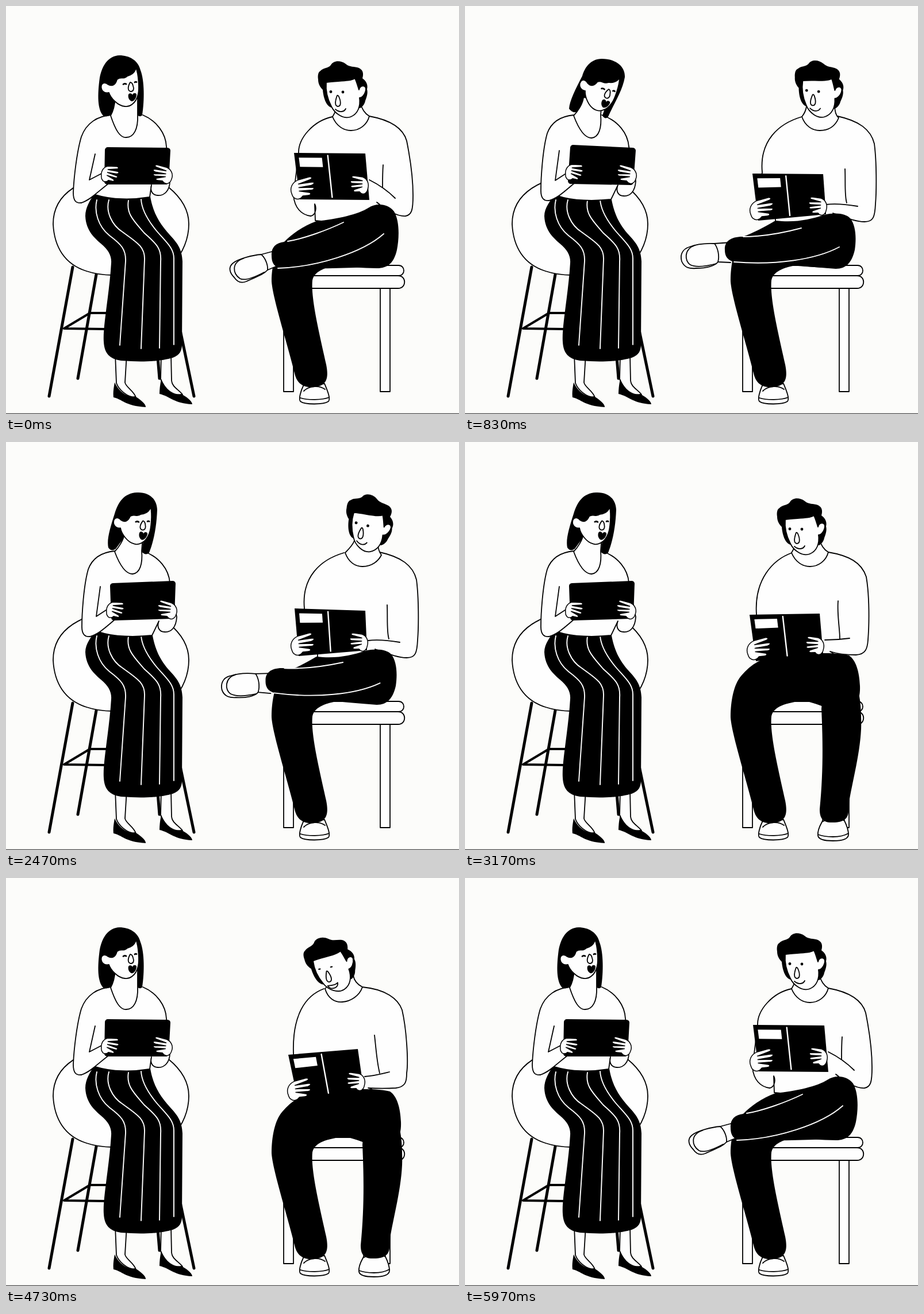
Write an HTML page that moves like this. It is 788x711 px and loops after 6010 ms.

```html
<!DOCTYPE html>
<html lang="en">
<head>
<meta charset="utf-8">
<title>Two seated readers</title>
<style>
  html, body { margin: 0; width: 100%; height: 100%; overflow: hidden; background: #fcfcfa; }
  svg { display: block; width: 100vw; height: 100vh; }
  .o { fill: #fefefe; stroke: #000; stroke-width: 1.8; stroke-linejoin: round; stroke-linecap: round; }
  .l { fill: none; stroke: #000; stroke-width: 1.8; stroke-linecap: round; stroke-linejoin: round; }
  .w { fill: none; stroke: #fff; stroke-width: 1.9; stroke-linecap: round; }
  .bar { fill: none; stroke: #000; stroke-width: 5; stroke-linecap: round; }
  .thin { stroke-width: 4; }
  .hand { fill: #fefefe; stroke: #000; stroke-width: 1.5; stroke-linejoin: round; vector-effect: non-scaling-stroke; }
</style>
</head>
<body>
<svg viewBox="0 0 788 711">
  <defs>
    <path id="hand" class="hand" d="M1 20C0 9 7 1 16 0L34 1C39 2 38 6 33 6L15 7L36 11C40 13 38 16 33 16L14 13L34 20C37 22 35 25 31 24L13 19L27 27C30 30 27 32 24 31L16 29C12 33 5 33 3 28C1 26 1 23 1 20Z"/>
  </defs>
  <rect y="709.7" width="788" height="1.3" fill="#555"/>

  <!-- woman: chair, legs, skirt -->
  <path class="bar" d="M116 455L75 680M157 468L125 649M303 565L327 680M264 612L267 649"/>
  <path class="bar thin" d="M101 562L172 563M101 562L146 535H178"/>
  <path class="o" d="M200 296C135 296 82 325 82 380C84 420 102 450 140 462C155 467 170 469 186 469L290 450C308 430 318 405 318 380C318 352 300 330 283 316Z"/>
  <path class="o" d="M190 606L192 657C196 668 210 682 226 682C222 670 208 664 207 656L210 606M270 606L269 650C276 668 290 680 307 677C300 668 289 664 288 653L287 606"/>
  <path d="M189 656C187 667 186 675 187 682C202 685 207 697 243 699C244 694 232 684 224 680C214 683 197 674 189 656ZM270 650C268 660 267 668 267 676C285 680 293 693 324 694C324 688 312 680 305 676C294 680 278 670 270 650Z"/>
  <path id="skirt"/>
  <path class="w" d="M158 338C153 358 160 384 180 400C200 415 209 424 208 445L198 591M179 338C173 358 184 382 203 394C228 412 242 420 241 442L235 597M213 339C209 362 222 374 240 395C258 412 271 420 269 445L267 596M235 337C236 355 248 375 262 392C280 413 292 422 292 440V590"/>

  <!-- woman: torso, head, tablet -->
  <path id="wShirt" class="o"/>
  <path id="wHair"/>
  <path id="wNeck" class="o"/>
  <g id="wHead">
    <path class="o" d="M178 137C186 141 191 136 193 128C200 122 204 129 211 122C216 121 225 117 226 107C231 120 232 145 230 153C226 172 213 176 207 175C194 174 182 160 179 151C170 153 164 146 166 138C168 133 174 133 178 137Z"/>
    <path class="l" d="M216 133C211 142 212 148 217 149C222 149 223 144 221 139C220 135 218 133 216 133Z"/>
    <path class="l" style="stroke-width:2.8" d="M204 136.5C206 135 207 135 209 136M224 133C225 132 226 132 227 132.500"/>
    <path d="M213 154C215 151 219 152 220 155C221 151 226 151 227 154C227 161 222 167 218 166C213 163 212 158 213 154Z"/>
  </g>
  <path id="wArm" class="o"/>
  <path id="tablet" stroke="#000" stroke-width="10" stroke-linejoin="round"/>
  <g id="wHandL"><use href="#hand" transform="translate(165 279) scale(.82 .85)"/></g>
  <g id="wHandR"><use href="#hand" transform="translate(294 286) rotate(18) scale(-.95 .85)"/></g>

  <!-- man: stool, planted foot -->
  <path class="o" d="M483 492H500V672H483ZM651 492H668V672H651Z"/>
  <path class="o" d="M520 452H683C695 452 695 470 683 470H520Z"/>
  <path class="o" d="M520 470H682C697 470 697 492 682 492H520Z"/>
  <path class="o" d="M518 660C512 672 509 685 512 689C520 695 552 695 561 689C565 684 559 670 554 658ZM512 683C525 687 550 687 562 682"/>
  <path class="l" d="M518 671C528 661 546 661 555 668"/>

  <g id="mBody">
    <path id="mShirt" class="o"/>
    <path id="mArm" class="l"/>
  </g>
  <path id="pants"/>
  <path id="ankle" class="o"/>
  <path id="shoe" class="o"/>
  <path id="sole" class="l"/>
  <path id="shin"/>
  <g id="seams"><path id="seamA" class="w"/><path id="seamB" class="w"/></g>

  <path id="mNeck" class="o"/>
  <g id="mHead">
    <path d="M547 113C553 107 560 109 565 103C569 95 582 94 591 101C598 107 606 105 614 108C622 112 622 119 620 126C627 131 630 138 628 145C630 152 627 160 625 165C624 171 620 176 616 178L566 177C556 174 552 158 551 146C545 140 543 134 543 128C542 121 543 115 547 113Z"/>
    <path class="o" d="M557 133C575 130 598 132 607 126C610 132 612 140 614 146C616 138 625 137 626 144C626 152 620 160 615 160C617 175 612 188 600 193C588 198 572 188 566 175C558 160 556 145 557 133Z"/>
    <path class="l" d="M576 156C572 167 572 174 577 175C583 175 583 167 579 158C578 156 577 155 576 156Z"/>
    <ellipse id="eyeL" cx="565" cy="149.500" rx="2.4"/>
    <ellipse id="eyeR" cx="586" cy="150" rx="2.4"/>
    <path id="mMouth" class="o"/>
  </g>
  <path id="book"/>
  <path id="label" fill="#fff"/>
  <path id="spine" class="w" style="stroke-width:2.4"/>
  <g id="mHandL"><use href="#hand" transform="translate(490 309) rotate(-18) scale(1.15 1)"/></g>
  <g id="mHandR"><use href="#hand" transform="translate(634 301) rotate(12) scale(-.87 .9)"/></g>
</svg>

<script>
const LOOP = 6010;
const KNEE = [650, 410];

// Each track lists [time, pose]; equal neighbours are holds.
const tracks = {
  woman: [[60, 0], [800, 1], [1900, 1], [2460, 2], [3220, 2], [3900, 0], [LOOP, 0]],
  man: [[0, 0], [650, 1], [1900, 1], [2460, 2], [2560, 2], [3160, 3], [3820, 3], [4420, 4], [5100, 4], [5800, 0], [LOOP, 0]],
  leg: [[0, 0], [650, 1], [1900, 1], [2460, 2], [2560, 2], [3160, 3], [4740, 3], [5560, 0], [LOOP, 0]]
};

// Poses of the woman: resting, leaning, upright.
const wHead = [[0, 0, 0], [15, 6, 22], [15, 3, 8]];
const wHandL = [[0, 0], [9, -3], [9, 0]];
const wHandR = [[0, 0], [9, 0], [8, -1]];
const wHair = [
  "M197 86C180 87 168 100 163 125C159 155 159 180 169 191C174 194 180 192 183 188L200 160L229 165L229 190C231 193 235 193 237 190C241 165 241 130 234 112C230 95 215 86 197 86Z",
  "M238 92C218 92 208 108 204 122C192 145 182 165 181 179C185 184 190 187 195 184L214 160L246 170L239 191C242 196 246 197 249 193C258 172 274 148 278 124C279 105 262 92 238 92Z",
  "M228 88C205 89 195 105 189 125C181 150 175 170 178 184C182 190 187 189 191 186L210 160L240 165L236 191C240 196 245 197 249 193C258 170 262 145 263 118C262 98 248 87 228 88Z"
];
const tablet = [
  "M177 251L281 252L278 306L176 306Z",
  "M188 247L292 252L288 307L184 305Z",
  "M186 251L290 247L288 303L188 306Z"
];
const wShirt = twice([
  "M182 190C160 192 140 203 131 228C123 255 118 300 117 325C117 340 122 344 131 343C142 340 150 332 156 329C185 338 220 338 250 333L253 312C250 322 255 330 264 330C275 331 285 322 285 305L279 245C278 222 262 200 238 190",
  "M189 190C168 192 151 200 143 222C135 250 132 300 132 322C132 336 138 340 146 339C154 337 158 334 162 331C188 340 225 340 254 337L266 312C262 322 266 331 276 331C288 332 296 322 297 305L285 245C283 222 267 200 238 190"
]);
const wNeck = twice([
  "M190 160C189 175 186 184 182 191C190 215 198 230 209 229C222 229 230 215 229 190L229 160",
  "M206 160C204 172 196 184 189 191C198 215 208 230 220 230C233 229 238 212 236 190L238 165"
]);
const wArm = twice([
  "M155 258L145 303L168 291L186 304C165 318 150 336 131 343",
  "M164 252L157 304L177 291L195 305C178 318 164 334 146 339"
]);

// Poses of the man: open, leaning back, looking up, book on lap, reading closely.
const mHead = [[0, 0, 0], [26, 0, 4], [33, -2, 13], [0, 2, 0], [-11, 1, -12]];
const mBody = [[0, 0], [0, 0], [2, 0], [0, 0], [0, 0]];
const mHandL = [[0, 0], [0, 36], [0, 35], [-5, 43], [-6, 51]];
const mHandR = [[0, 0], [-1, 37], [-1, 37], [-6, 43], [-6, 43]];
const squint = [[0], [0], [0], [0], [1]];
const corners = [
  [501, 256, 625, 257, 632, 338, 511, 337],
  [500, 292, 623, 293, 628, 363, 510, 374],
  [502, 290, 625, 294, 628, 363, 509, 373],
  [495, 301, 617, 299, 623, 370, 506, 382],
  [491, 308, 612, 298, 622, 368, 508, 388]
];
const openNeck = "M576 168C575 180 572 187 568 193C575 210 588 217 600 217C615 217 628 207 632 192C625 188 619 180 616 168";
const mNeck = [
  openNeck,
  "M594 175C593 182 590 188 586 193C592 210 605 217 617 217C635 217 645 207 650 195C644 190 643 182 643 172",
  "M606 172C603 180 596 187 590 193C596 210 608 217 620 217C637 217 648 207 653 197C648 190 647 184 647 174",
  openNeck,
  "M564 185C560 188 557 190 555 193C560 210 572 217 585 216C600 215 615 205 620 190C612 186 606 180 604 170"
];
const leanShirt = "M586 193C545 205 512 235 517 290L510 335C512 350 516 360 525 366C535 368 540 368 540 370L540 385L650 385C655 375 650 366 640 361C660 368 680 376 695 376C710 376 713 368 714 345C716 320 716 270 712 240C706 215 685 200 648 192";
const mShirt = [
  "M568 193C535 200 508 230 509 257L500 330C502 352 514 364 530 366C540 364 540 350 537 345L538 374L650 385C660 350 650 345 645 342C660 355 680 367 695 366C706 364 708 355 708 330C708 300 703 265 697 235C690 210 665 198 632 192",
  leanShirt, leanShirt,
  "M569 193C535 205 503 240 507 300L505 340C507 355 510 365 520 370C530 372 535 374 535 376L535 390L645 390C650 380 645 370 635 365C650 370 665 371 680 371C697 370 700 360 701 345C703 320 704 270 698 235C690 210 668 198 632 192",
  "M553 193C520 205 498 240 500 305L502 340C505 355 510 365 520 370C530 372 535 374 535 376L535 390L645 390C650 380 645 370 630 366C650 367 660 367 678 366C695 364 697 355 697 340C700 320 697 265 689 230C682 210 660 194 620 190"
];
const leanArm = "M661 284C662 305 660 330 664 343M628 346C645 344 665 346 683 349";
const mArm = [
  "M656 277C655 290 655 305 655 316M632 303C650 312 664 322 677 335",
  leanArm, leanArm,
  "M649 277C647 300 652 325 652 343M626 345C640 345 655 344 669 342",
  "M641 274C644 300 645 320 650 340M624 346C640 345 655 341 667 338"
];
const mouth = [
  "M573 180C580 186 588 185 591 179C588 185 580 186 573 180Z",
  "M573 181C580 182 588 182 591 179C592 188 577 191 573 181Z"
];

// Leg poses: raised, level, level and kicked, planted.
const planted = "C560 455 537 460 533 478C530 510 545 570 557 625C562 650 557 662 537 664C520 666 506 660 502 640C490 590 464 510 462 480";
const lap = [
  "M540 375C575 372 615 362 630 352C645 342 665 345 675 358C685 375 684 405 680 425C675 447 665 457 645 457C620 457 595 454 575 452" + planted + "C462 450 470 425 484 411C497 398 515 384 540 375Z",
  "M540 374C575 378 600 372 625 364C645 359 663 362 670 370C680 382 681 405 678 425C673 447 663 458 645 458C620 456 595 454 575 452" + planted + "C462 450 468 420 483 402C500 396 520 386 540 374Z",
  "M515 380C560 366 600 368 625 368C645 368 660 370 668 372C680 380 686 400 687 425C688 450 680 470 645 470C620 460 600 451 585 451" + planted + "C462 450 468 422 480 408C490 396 502 386 515 380Z"
];
const swings = {
  shin: [
    "M635 365C600 378 540 400 484 411C468 413 461 422 462 435C462 445 465 455 478 457C545 459 620 455 650 455C683 440 685 385 635 365Z",
    "M635 371C600 385 540 400 483 402C460 402 451 412 452 425C452 435 456 444 470 446C540 450 600 455 645 457C680 445 682 385 635 371Z",
    "M620 465C622 510 624 570 617 640C617 655 622 664 640 663C660 663 668 655 667 640C668 610 692 535 689 480C690 385 630 340 620 465Z"
  ],
  ankle: [
    "M470 426L444 433L455 460L474 452",
    "M462 412L434 414L440 446L462 447",
    "M624 650L621 664L660 662L659 650"
  ],
  shoe: [
    "M444 433C430 434 405 440 395 448C386 455 389 465 397 473C403 482 411 483 418 480C435 472 448 468 455 460C456 450 450 438 444 433Z",
    "M434 414C415 413 400 416 390 420C377 424 374 435 377 445C382 457 392 458 402 457C420 457 435 453 440 446C443 435 440 422 434 414Z",
    "M621 662C616 671 613 680 614 686C615 692 625 695 640 695C655 695 667 692 667 684C667 676 664 668 660 660C650 656 630 656 621 662Z"
  ],
  sole: [
    "M413 440C392 447 394 466 407 475C416 480 434 472 449 464",
    "M400 417C380 424 382 445 392 451C402 456 422 453 437 449",
    "M614 684C622 687 630 688 640 688C650 688 660 686 667 682"
  ],
  seamA: [
    "M490 410C520 405 560 390 587 377",
    "M484 402C520 402 555 395 585 387",
    "M622 640C624 590 624 530 624 480"
  ],
  seamB: [
    "M473 457C540 455 620 430 657 397",
    "M468 446C540 452 610 442 651 420",
    "M664 640C668 590 680 530 684 480"
  ]
};
const legPath = [0, 1, 1, 2];
const baseAngle = [0, 0, 0, -90];
const legAngle = [0, 0, 2.7, -90];

const $ = id => document.getElementById(id);
const set = (id, name, value) => $(id).setAttribute(name, value);
const lerp = (a, b, t) => a + (b - a) * t;
const ease = t => t * t * (3 - 2 * t);
const NUM = /-?\d+(\.\d+)?/g;

function twice([rest, lean]) { return [rest, lean, lean]; }

function poseAt(keys, time) {
  let i = keys.findIndex(k => k[0] > time);
  if (i < 0) i = keys.length - 1;
  const [t1, b] = keys[i], [t0, a] = keys[i - 1] || [0, b];
  return { a, b, t: ease((time - t0) / (t1 - t0)) };
}

function mixPath(p, q, t) {
  const to = q.match(NUM);
  let i = 0;
  return p.replace(NUM, v => lerp(+v, +to[i++], t).toFixed(2));
}

const blend = (list, { a, b, t }) => mixPath(list[a], list[b], t);
const values = (list, { a, b, t }) => list[a].map((v, i) => lerp(v, list[b][i], t));

function spin([x, y], deg) {
  const r = deg * Math.PI / 180, c = Math.cos(r), s = Math.sin(r);
  const dx = x - KNEE[0], dy = y - KNEE[1];
  return [KNEE[0] + dx * c - dy * s, KNEE[1] + dx * s + dy * c];
}

// Blends two leg outlines while turning them about the knee.
function swing(list, { a, b, t }) {
  const p = list[legPath[a]], to = list[legPath[b]].match(NUM).map(Number);
  const turn = lerp(legAngle[a], legAngle[b], t);
  let i = 0;
  return p.replace(/([\d.]+) ([\d.]+)/g, (_, x, y) => {
    const from = spin([+x, +y], -baseAngle[a]);
    const next = spin([to[i++], to[i++]], -baseAngle[b]);
    return spin([lerp(from[0], next[0], t), lerp(from[1], next[1], t)], turn).map(v => v.toFixed(2)).join(" ");
  });
}

function move(id, list, pose, px = 0, py = 0) {
  const [x, y, r = 0] = values(list, pose);
  set(id, "transform", `translate(${x} ${y}) rotate(${r} ${px} ${py})`);
}

function drawWoman(pose) {
  const d = values([[0], [3], [3]], pose)[0];
  set("skirt", "d", `M${153 + d} 329C${146 + d} 338 138 352 138 366C139 392 155 405 165 414C178 425 184 435 183 448C180 500 168 560 170 585C171 605 180 615 200 618C240 621 270 619 290 613C303 608 306 600 306 590L307 445C306 425 300 415 285 399C268 380 ${256 + d} 362 ${251 + d} 332Z`);
  const shapes = { wShirt, wHair, wNeck, wArm, tablet };
  for (const id in shapes) set(id, "d", blend(shapes[id], pose));
  move("wHead", wHead, pose, 210, 185);
  move("wHandL", wHandL, pose);
  move("wHandR", wHandR, pose);
}

function drawBook(pose) {
  const [x0, y0, x1, y1, x2, y2, x3, y3] = values(corners, pose);
  const at = (u, v) => [
    lerp(lerp(x0, x1, u), lerp(x3, x2, u), v),
    lerp(lerp(y0, y1, u), lerp(y3, y2, u), v)
  ].map(n => n.toFixed(2)).join(" ");
  const quad = (u, v, U, V) => `M${at(u, v)}L${at(U, v)}L${at(U, V)}L${at(u, V)}Z`;
  set("book", "d", quad(0, 0, 1, 1));
  set("label", "d", quad(.06, .1, .385, .3));
  set("spine", "d", `M${at(.47, .05)}L${at(.47, .95)}`);
}

function drawMan(pose, leg) {
  const shapes = { mShirt, mArm, mNeck };
  for (const id in shapes) set(id, "d", blend(shapes[id], pose));
  move("mBody", mBody, pose);
  move("mHead", mHead, pose, 600, 195);
  move("mHandL", mHandL, pose);
  move("mHandR", mHandR, pose);
  drawBook(pose);

  const s = values(squint, pose)[0];
  for (const id of ["eyeL", "eyeR"]) set(id, "ry", lerp(2.4, 1.2, s));
  set("mMouth", "d", mixPath(mouth[0], mouth[1], s));

  set("pants", "d", mixPath(lap[legPath[leg.a]], lap[legPath[leg.b]], leg.t));
  for (const id in swings) set(id, "d", swing(swings[id], leg));
  const down = lerp(leg.a === 3 ? 1 : 0, leg.b === 3 ? 1 : 0, leg.t);
  set("seams", "opacity", Math.max(0, 1 - down * 2.5));
}

const start = performance.now();
function frame(now) {
  const time = Math.max(0, now - start) % LOOP;
  drawWoman(poseAt(tracks.woman, Math.max(time, 60)));
  drawMan(poseAt(tracks.man, time), poseAt(tracks.leg, time));
  requestAnimationFrame(frame);
}
frame(start);
</script>
</body>
</html>
```
